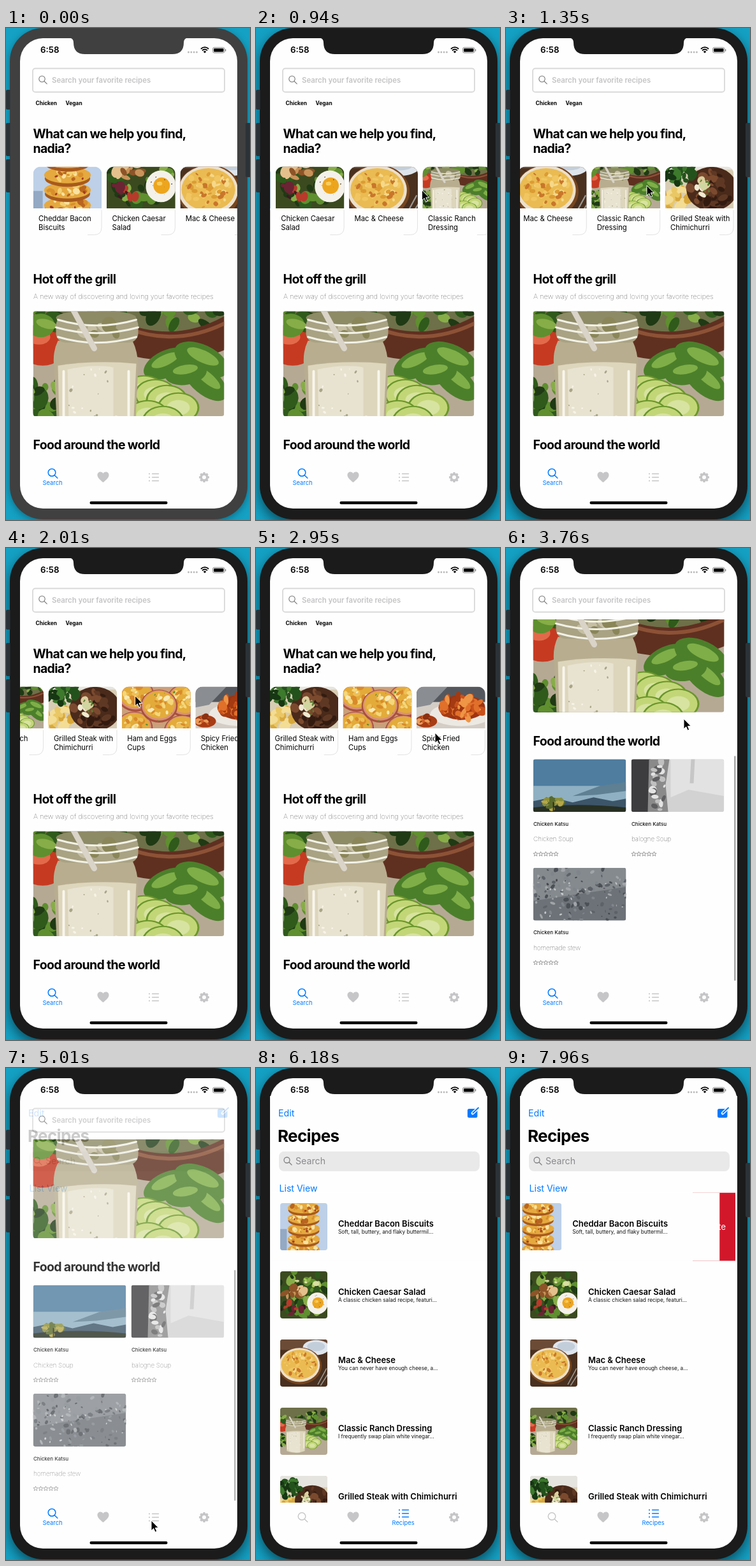
An HTML page that plays this animation: 383 by 772 pixels, repeating every 8 s.

```html
<!DOCTYPE html>
<html lang="en">
<head>
<meta charset="utf-8">
<title>Recipe app</title>
<style>
  html, body { margin: 0; width: 100%; height: 100%; overflow: hidden; background: #14a1c4; }
  svg { display: block; }
  text { font-family: Inter, "Liberation Sans", sans-serif; }
</style>
</head>
<body>
<svg id="stage" width="383" height="772" viewBox="0 0 383 772"></svg>
<script>
const BLUE = '#007aff', GREY = '#c6c6c8';

// ---------- drawing helpers ----------
let seed = 7, clips = 0;
const rnd = () => (seed = (seed * 16807) % 2147483647) / 2147483647;
const rect = (x, y, w, h, fill, r = 0, more = '') =>
  `<rect x="${x}" y="${y}" width="${w}" height="${h}" rx="${r}" fill="${fill}" ${more}/>`;
const oval = (x, y, rx, ry, fill, more = '') =>
  `<ellipse cx="${x}" cy="${y}" rx="${rx}" ry="${ry}" fill="${fill}" ${more}/>`;
const path = (d, fill, more = '') => `<path d="${d}" fill="${fill}" ${more}/>`;
const line = (d, color, width = 1) =>
  path(d, 'none', `stroke="${color}" stroke-width="${width}" stroke-linecap="round"`);
const text = (x, y, size, weight, str, fill = '#000', spacing = 0) =>
  `<text x="${x}" y="${y}" font-size="${size}" font-weight="${weight}" fill="${fill}" letter-spacing="${spacing}em">${str}</text>`;
const heading = (x, y, str) => text(x, y, 19.5, 700, str, '#000', -.035);
const group = (id, body) => `<g id="${id}">${body}</g>`;
const clip = (x, y, w, h, r, body) => {
  const id = 'clip' + clips++;
  return `<clipPath id="${id}">${rect(x, y, w, h, '#000', r)}</clipPath><g clip-path="url(#${id})">${body}</g>`;
};

// Scattered ovals inside an elliptical area
function blobs(n, cx, cy, rx, ry, size, colors) {
  let out = '';
  for (let i = 0; i < n; i++) {
    const a = rnd() * 6.283, d = Math.sqrt(rnd()), r = size * (.5 + rnd());
    const x = (cx + Math.cos(a) * d * rx).toFixed(1), y = (cy + Math.sin(a) * d * ry).toFixed(1);
    out += oval(x, y, r.toFixed(1), (r * (.4 + rnd() * .5)).toFixed(1), colors[i % colors.length],
      `transform="rotate(${(rnd() * 180) | 0} ${x} ${y})"`);
  }
  return out;
}

// ---------- pictures, 100 x 100 unless noted ----------
const GREENS = ['#2f5a1c', '#5f8f2f', '#87ad48', '#1f3a14'];
const GOLD = ['#f3cf72', '#d98f2c', '#f9e2a0', '#b9651f'];

const biscuits = () => rect(0, 0, 100, 100, '#bdd0e8') + rect(0, 55, 14, 45, '#93a9c4') +
  [98, 76, 54, 32, 10].map(y => oval(50, y + 5, 33, 12, '#a85a1c') + oval(50, y, 34, 12, '#e5a93f') +
    blobs(16, 50, y, 29, 8, 4, GOLD) + blobs(2, 50, y + 4, 28, 4, 2, ['#a33a20'])).join('');

const caesar = () => rect(0, 0, 100, 100, '#3c4a20') + blobs(50, 45, 45, 55, 50, 9, GREENS) +
  blobs(14, 30, 45, 22, 12, 8, ['#c9935a', '#8d5428', '#e4c08c']) +
  blobs(8, 25, 75, 25, 15, 6, ['#6b2433', '#b83a2a', '#3c1a22']) +
  blobs(6, 62, 20, 30, 12, 6, ['#a9c65f', '#d9dfa0']) +
  oval(79, 68, 22, 23, '#f4f1ea') + oval(80, 67, 12, 12, '#eda51e') + oval(77, 64, 4, 3, '#f8cc5c') +
  blobs(10, 79, 68, 17, 18, .7, ['#554433']);

const mac = () => rect(0, 0, 100, 100, '#49301f') + rect(0, 0, 100, 22, '#6b4b36') +
  oval(76, 17, 28, 16, '#dfe5ec') + oval(76, 15, 19, 10, '#c3cedb') +
  oval(42, 56, 46, 39, '#76451f') + oval(41, 54, 43, 36, '#ece0cb') + oval(41, 53, 39, 31, '#eabb52') +
  blobs(60, 41, 53, 34, 26, 3.5, ['#f6d889', '#dc9c33', '#f1c662', '#c9762a']) +
  line('M80 95 L98 62 M86 97 L102 72', '#9b9a96', 2);

const ranch = () => rect(0, 0, 100, 100, '#b5a994') + rect(0, 0, 100, 42, '#6d7048') +
  blobs(30, 70, 20, 38, 12, 5, GREENS) +
  path('M46 28 Q75 40 102 24 V42 Q80 52 52 46Z', '#5f3020') + line('M48 31 Q75 42 102 28', '#8d5236', 2) +
  oval(5, 40, 13, 11, '#c63a22') + oval(3, 36, 6, 4, '#e26a4a') + blobs(7, 5, 24, 10, 6, 5, GREENS) +
  blobs(40, 4, 70, 14, 14, 4, GREENS) +
  [[70, 50, 13, 7, -25], [88, 48, 15, 8, 25], [90, 59, 14, 7, 40], [80, 55, 11, 6, -10]].map(([x, y, a, b, r]) =>
    oval(x, y, a, b, '#4c7f2a', `transform="rotate(${r} ${x} ${y})"`) +
    oval(x, y - 2, a * .6, b * .4, '#7fae48', `transform="rotate(${r} ${x} ${y})"`)).join('') +
  [[58, 64], [64, 66], [70, 69], [76, 73], [60, 77], [68, 80]].map(([x, y]) =>
    oval(x, y, 11, 8, '#6a962c') + oval(x, y, 10, 7.3, '#c3d677') + oval(x, y, 6, 4, '#d7e3a0')).join('') +
  path('M13 38 Q10 44 11 52 L13 92 Q33 100 53 92 L55 52 Q55 44 52 38Z', '#b8ad8f') +
  path('M13 51 Q33 48 54 50 L52 92 Q33 99 14 92Z', '#ddd6bd') + path('M18 53 Q33 50 42 52 V95 Q28 96 19 92Z', '#e8e3d1') +
  blobs(22, 33, 70, 17, 18, .7, ['#a9a587', '#f7f4e6']) +
  rect(12, 25, 43, 14, '#a9a283', 5) + oval(33, 26, 21, 4, '#8d8a66') + blobs(8, 38, 33, 13, 4, 3, ['#8a8659', '#c6bfa4']) +
  line('M12 31 Q33 37 55 31 M13 36 Q33 42 54 36 M13 27 Q33 33 54 27', '#f1f1e6', 1) +
  line('M20 20 L32 42', '#d9d3c8', 3) + line('M16 54 V88 M50 54 V86', '#f8f6ec', 1.3);

const steak = () => rect(0, 0, 100, 100, '#d8cdb4') + rect(0, 0, 100, 24, '#e6e4df') +
  blobs(26, 15, 66, 24, 18, 7, ['#e9c765', '#d8a83c', '#f3dc94']) +
  oval(68, 52, 37, 32, '#4a2a1a') + blobs(34, 68, 52, 32, 27, 6, ['#5f3824', '#7b4a2e', '#331b10']) +
  blobs(48, 19, 27, 24, 20, 6, ['#24521c', '#3d7a2c', '#173613']) +
  blobs(12, 53, 50, 9, 12, 5, ['#f0ead2', '#cfd7a0', '#dccf9f']) +
  blobs(8, 55, 52, 12, 14, 1.5, ['#5a7d33']);

const eggs = () => rect(0, 0, 100, 100, '#c9a07a') + [[18, 80], [92, 40], [20, 32], [88, 85], [54, 48]].map(([x, y]) =>
  oval(x, y, 27, 24, '#a8503c') + oval(x, y - 1, 25, 22, '#d98f7a') + oval(x, y - 2, 23, 20, '#e3ab3a') +
  blobs(22, x, y - 2, 18, 15, 4, ['#f4d77c', '#d98a2a', '#f8e9b4', '#eebf55'])).join('') +
  blobs(10, 50, 55, 45, 35, 1.3, ['#5f8a3a']);

const fried = () => rect(0, 0, 100, 100, '#d3cdc6') + rect(0, 0, 100, 42, '#54585e') +
  path('M0 20 L45 20 L20 46 L0 50Z', '#8a8d92') +
  oval(65, 60, 45, 17, '#ece8e2') + oval(66, 50, 34, 18, '#9e3412') +
  blobs(44, 66, 49, 32, 17, 6, ['#c9501b', '#e0702a', '#a43a12', '#ee9546']) +
  oval(14, 70, 16, 9, '#a83c14') + blobs(14, 14, 69, 14, 7, 4, ['#d0602a', '#8c3010', '#e89c5a']);

// 146 x 83 pictures
const valley = () => rect(0, 0, 146, 83, '#4e7d9f') + rect(0, 42, 146, 30, '#8fb0c2') +
  path('M62 58 L105 42 L146 36 V50 L100 56Z', '#5f7f93') +
  path('M0 66 L30 60 L62 68 L95 60 L125 66 L146 62 V83 H0Z', '#3d5568') +
  path('M0 76 Q70 68 146 76 V83 H0Z', '#262f22') +
  blobs(28, 32, 69, 16, 10, 4, ['#8a8f3a', '#596a2a', '#b5a748']) + line('M32 68 V82', '#332c1c', 2);
const falls = () => rect(0, 0, 146, 83, '#d2d2d2') + rect(0, 0, 30, 83, '#3d3d3f') +
  path('M28 0 H60 L54 40 L58 83 H26Z', '#8a8a8b') + blobs(24, 43, 40, 11, 42, 5, ['#e3e3e3', '#5e5e60', '#c0c0c0']) +
  path('M62 0 H146 V58 L90 48 L62 60Z', '#e2e2e2') + path('M94 0 H100 L98 38 H92Z', '#c6c6c6');
const stone = () => rect(0, 0, 146, 83, '#6d7278') + path('M0 0 H146 V30 L0 52Z', '#858a8f') +
  blobs(130, 73, 42, 85, 50, 3, ['#4b5056', '#a1a5a9', '#5d6268', '#7f858b']) +
  blobs(30, 80, 50, 80, 40, 1.6, ['#c4c7c9', '#43474c']);

const photo = (draw, x, y, w, h, r, box = '0 0 100 100', align = 'xMidYMid') => clip(x, y, w, h, r,
  `<svg x="${x}" y="${y}" width="${w}" height="${h}" viewBox="${box}" preserveAspectRatio="${align} slice">${draw()}</svg>`);

// ---------- icons ----------
const lens = (x, y, r, color, w) =>
  `<circle cx="${x - 1.5}" cy="${y - 1.5}" r="${r}" fill="none" stroke="${color}" stroke-width="${w}"/>` +
  line(`M${x - 1.5 + r * .72} ${y - 1.5 + r * .72} L${x + r + 1.5} ${y + r + 1.5}`, color, w);
const heart = path('M152.5 713 C147 708.5 143.5 705.5 143.5 701.5 C143.5 696 150 695 152.5 699 C155 695 161.5 696 161.5 701.5 C161.5 705.5 158 708.5 152.5 713Z', GREY);
const list = (y, color) => [-5.5, 0, 5.5].map(d =>
  `<circle cx="225" cy="${y + d}" r="1.1" fill="${color}"/>` + line(`M229.5 ${y + d} H239.5`, color, 1.4)).join('');
const gear = [0, 45, 90, 135].map(a => rect(309.2, 697, 3.6, 16, GREY, 1, `transform="rotate(${a} 311 705)"`)).join('') +
  `<circle cx="311" cy="705" r="4.7" fill="#fefefe" stroke="${GREY}" stroke-width="3.4"/>`;
const star = (x, y) => {
  const pts = [...Array(10).keys()].map(i => {
    const a = i * Math.PI / 5, r = i % 2 ? 1.6 : 3.8;
    return (x + Math.sin(a) * r).toFixed(1) + ',' + (y - Math.cos(a) * r).toFixed(1);
  });
  return `<polygon points="${pts.join(' ')}" fill="none" stroke="#777" stroke-width=".7"/>`;
};

// ---------- search page ----------
const cards = [
  [biscuits, 'Cheddar Bacon', 'Biscuits'], [caesar, 'Chicken Caesar', 'Salad', 'xMidYMax'],
  [mac, 'Mac &amp; Cheese', ''], [ranch, 'Classic Ranch', 'Dressing'],
  [steak, 'Grilled Steak with', 'Chimichurri'], [eggs, 'Ham and Eggs', 'Cups'], [fried, 'Spicy Fried', 'Chicken']
].map(([draw, a, b, align], i) => {
  const x = 42.5 + i * 115.4;
  return clip(x, 217.5, 108, 108, 12, photo(draw, x, 217.5, 108, 65.5, 0, undefined, align)) +
    line(`M${x + 107.5} 286 V313 Q${x + 107.5} 324.5 ${x + 96} 324.5 H${x + 86}`, '#e2e2e2') +
    text(x + 8.5, 302.5, 11.3, 400, a) + text(x + 8.5, 316.5, 11.3, 400, b);
}).join('');

const tiles = [[valley, 42.5, 682.5, 'Chicken Soup'], [falls, 196.5, 682.5, 'balogne Soup'], [stone, 42.5, 853, 'homemade stew']]
  .map(([draw, x, y, name]) => photo(draw, x, y, 146, 83, 4, '0 0 146 83') +
    text(x + .5, y + 104.5, 8, 500, 'Chicken Katsu', '#111') +
    text(x + .5, y + 129, 9.9, 100, name, '#222') +
    [0, 1, 2, 3, 4].map(i => star(x + 4 + i * 8, y + 149)).join('')).join('');

const searchPage = clip(22, 112, 341, 570, 0, group('scroll',
  text(46.5, 120.5, 8.4, 700, 'Chicken') + text(93.5, 120.5, 8.4, 700, 'Vegan') +
  heading(42.5, 172.5, 'What can we help you find,') + heading(42.5, 196, 'nadia?') +
  group('cards', cards) +
  heading(42.5, 401, 'Hot off the grill') +
  text(43, 425, 10.9, 100, 'A new way of discovering and loving your favorite recipes', '#222') +
  photo(ranch, 42.5, 444.5, 300, 164.5, 4) +
  heading(42.5, 661, 'Food around the world') + tiles)) +
  rect(42, 63.5, 301, 37, '#fff', 4, 'stroke="#d9d9d9" stroke-width="1.8"') +
  lens(58, 81.5, 4.7, '#777', 1.1) +
  text(72, 85.5, 11.4, 600, 'Search your favorite recipes', '#c4c4c6') +
  rect(358, 0, 2.6, 362, '#a9a9a9', 1.3, 'id="thumb"');

// ---------- recipes page ----------
const row = ([draw, title, note], i) => photo(draw, 38, 212 + i * 107, 74, 74, 4) +
  text(129, 249 + i * 107, 13, 600, title) + text(129, 260 + i * 107, 8.3, 400, note, '#111');
const rows = [
  [biscuits, 'Cheddar Bacon Biscuits', 'Soft, tall, buttery, and flaky buttermil...'],
  [caesar, 'Chicken Caesar Salad', 'A classic chicken salad recipe, featuri...'],
  [mac, 'Mac &amp; Cheese', 'You can never have enough cheese, a...'],
  [ranch, 'Classic Ranch Dressing', 'I frequently swap plain white vinegar...'],
  [steak, 'Grilled Steak with Chimichurri', '']
].map(row);

const recipesPage = rect(22, 44, 341, 640, '#fefefe') +
  text(35, 75.5, 14.2, 400, 'Edit', BLUE) +
  rect(332, 64, 15.5, 14, BLUE, 2.5) + line('M340 71 L349 62.5', '#fff', 4.5) + line('M340.5 70.5 L349 62.5', BLUE, 2) +
  text(34, 115.5, 26, 700, 'Recipes', '#000', -.025) +
  rect(36, 131, 315, 31, '#e9e9e9', 8) + lens(50, 146, 4.5, '#808084', 1.3) +
  text(62, 151, 14.2, 400, 'Search', '#8a8a8e') + text(36.5, 193.5, 14.1, 400, 'List View', BLUE) +
  clip(25, 195.5, 335, 486.5, 0, group('rows',
    group('delete', rect(293, 195.5, 67, 107, '#d3172b') + text(304.5, 253.5, 13.4, 400, 'Delete', '#fff')) +
    group('row', rect(0, 195.5, 360, 107, '#fefefe') + rows[0]) + rows.slice(1).join('')));

const tabs = heart + gear +
  group('searchTab', lens(73.5, 699, 5.8, BLUE, 1.5) + text(57.5, 717, 9.4, 400, 'Search', BLUE) + list(705, GREY)) +
  group('recipesTab', lens(73.5, 705, 5.8, GREY, 1.4) + list(699, BLUE) + text(213.5, 717, 9.4, 400, 'Recipes', BLUE));

// ---------- phone ----------
const buttons = [[0, 97, 31], [0, 149, 52], [0, 206, 52], [376, 149, 85]].map(([x, y, h]) => rect(x, y, 8, h, '#2c3338', 2)).join('');
const statusBar = text(54, 39, 13.3, 600, '6:58') +
  [286.5, 290.8, 295.1, 299.4].map(x => `<circle cx="${x}" cy="38" r="1.4" fill="#b8b8b8"/>`).join('') +
  path('M312 39.5 L309.7 37 Q312 35.2 314.3 37Z', '#000') +
  path('M308 35.2 Q312 31.7 316 35.2 M305.9 32.7 Q312 27.5 318.1 32.7', 'none', 'stroke="#000" stroke-width="1.8"') +
  rect(324.5, 30.5, 18.5, 8.5, 'none', 2.5, 'stroke="#888"') + rect(326, 32, 15.5, 5.5, '#000', 1.3) + rect(344, 33, 1.3, 3.5, '#888', .6);

stage.innerHTML = rect(0, 0, 383, 772, '#14a1c4') +
  rect(6, 0, 373, 771, '#404040', 52, 'id="body"') + buttons + rect(6.5, 90, 20, 180, '#404040', 0, 'id="side"') +
  rect(22, 16, 341, 738, '#fefefe', 36) +
  path('M99 15 Q106 16 106 23 Q106 41 124 41 H261 Q279 41 279 23 Q279 16 286 15Z', '#404040', 'id="notch"') +
  statusBar + searchPage + group('recipes', recipesPage) + tabs +
  rect(131.5, 742.7, 122, 4.6, '#000', 2.3) +
  path('M0 0 V16 L3.7 12.6 L6.1 18.2 L8.7 17.1 L6.3 11.6 H11.3Z', '#000', 'id="cursor" stroke="#fff"');

// ---------- motion ----------
const smooth = p => p * p * (3 - 2 * p);
const glide = p => 1 - (1 - p) ** 2;
const linear = p => p;
function track(t, keys, ease = smooth) {
  const i = keys.findIndex(k => k[0] > t);
  if (i < 0) return keys[keys.length - 1][1];
  if (!i) return keys[0][1];
  const [t0, a] = keys[i - 1], [t1, b] = keys[i];
  return a + (b - a) * ease((t - t0) / (t1 - t0));
}
const set = (id, name, value) => document.getElementById(id).setAttribute(name, value);
const show = (id, on) => set(id, 'opacity', +on);
const move = (id, x, y) => set(id, 'transform', `translate(${x.toFixed(2)} ${y.toFixed(2)})`);

const pointer = [[530, 300, 262], [1350, 221, 247], [1700, 150, 240], [2130, 215, 230], [2540, 262, 160], [2720, 262, 160],
  [2950, 281, 290], [3320, 280, 108], [3760, 279, 268], [4310, 236, 691], [4480, 231, 722], [4660, 228, 710],
  [5250, 228, 710], [5760, 290, 240]];
const pointerX = pointer.map(k => [k[0], k[1]]), pointerY = pointer.map(k => [k[0], k[2]]);

function draw(t) {
  const active = t >= 530, shell = active ? '#1b1b1b' : '#404040';
  for (const id of ['body', 'side', 'notch']) set(id, 'fill', shell);
  set('body', 'style', `filter: drop-shadow(0 ${active ? '8px 10px #0008' : '3px 6px #0005'})`);

  // Steady drag, then a coasting swipe
  move('cards', -track(t, [[530, 0], [1350, 254.5], [2540, 483]], t < 1350 ? linear : glide), 0);

  // Vertical swipe past the end, then the bounce back
  const y = track(t, [[2950, 0], [3540, 354], [4250, 342]]), over = Math.max(0, y - 342);
  move('scroll', 0, -y);
  set('thumb', 'y', 114 + (y - over) * 203 / 342 + over);
  set('thumb', 'height', 362 - over);
  show('thumb', t > 2950);

  const switched = t >= 5060;
  set('recipes', 'opacity', t < 5010 ? 0 : track(t, [[5010, .2], [5300, 1]], linear));
  show('rows', switched);
  show('recipesTab', switched);
  show('searchTab', !switched);

  const swipe = track(t, [[7290, 0], [7600, 67], [7860, 67], [8030, 0]]);
  move('row', -swipe, 0);
  show('delete', swipe > 0);

  move('cursor', track(t, pointerX), track(t, pointerY));
  show('cursor', active && t < 5760);
}

let start;
function frame(now) {
  start ??= now;
  draw((now - start) % 8000);
  requestAnimationFrame(frame);
}
draw(0);
requestAnimationFrame(frame);
</script>
</body>
</html>
```
